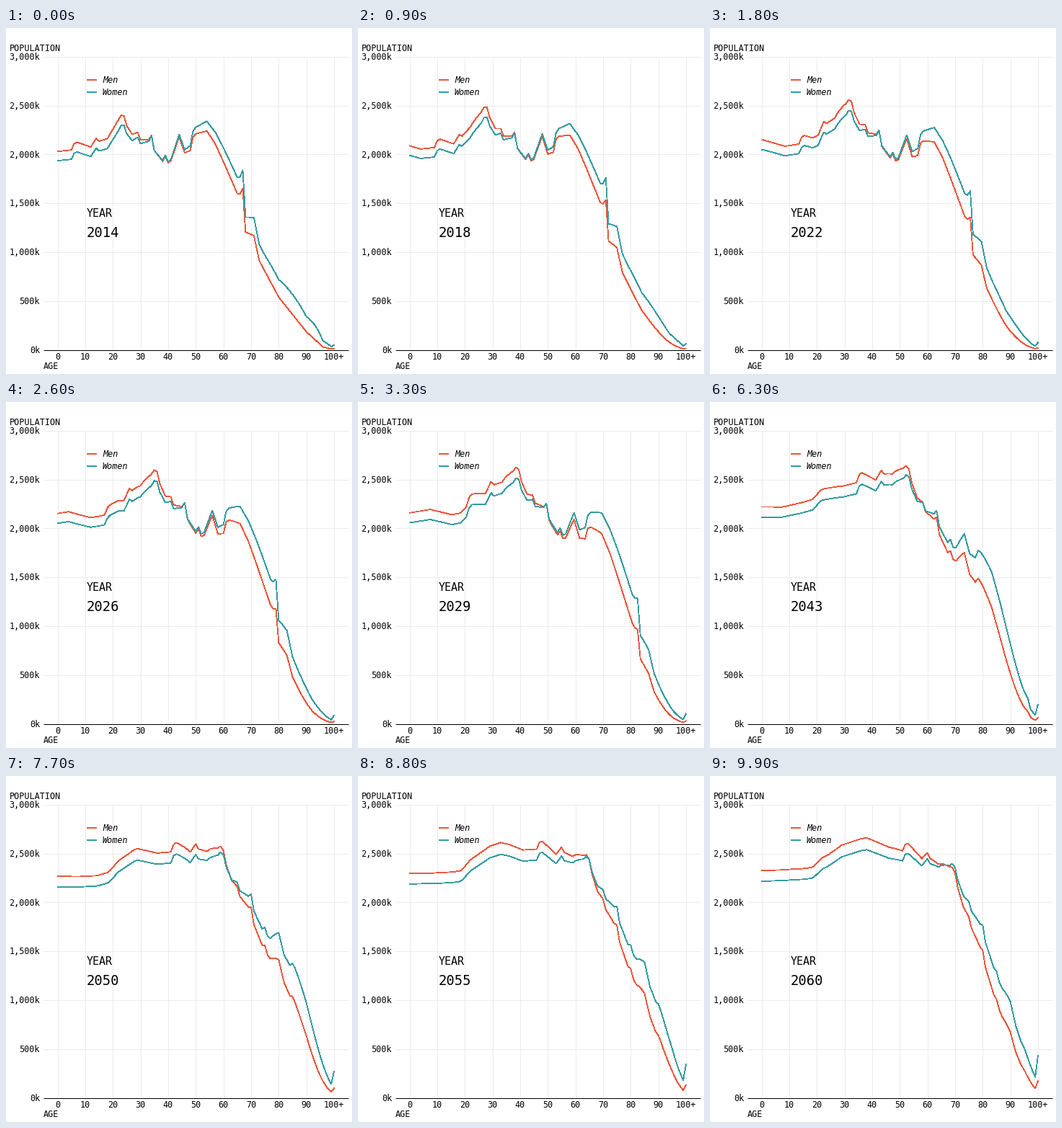
A matplotlib script for the animation above (10 s loop, 480 by 480 pixels).

```python
import numpy as np
import matplotlib.pyplot as plt
from matplotlib.animation import FuncAnimation

SIZE, DPI, FRAMES = 480, 100, 100
FIRST, SPAN = 2014, 46
MEN, WOMEN, GRID = "#e8593f", "#369ba1", "#ebebeb"
PT = 72 / DPI

# Men per cohort in thousands, by age in the first year; negative ages are
# cohorts still to be born, counted at birth.
COHORTS = np.array([
    (-46, 2325), (-36, 2265), (-22, 2170), (-8, 2145), (0, 2030), (5, 2045),
    (6, 2110), (7, 2125), (12, 2075), (14, 2165), (15, 2135), (18, 2160),
    (23, 2400), (24, 2395), (25, 2295), (27, 2205), (29, 2225), (30, 2150),
    (33, 2150), (34, 2195), (35, 2040), (38, 1930), (39, 1980), (40, 1915),
    (41, 1935), (44, 2180), (46, 2015), (48, 2040), (49, 2175), (50, 2210),
    (54, 2240), (57, 2110), (60, 1925), (65, 1600), (66, 1595), (67, 1650),
    (68, 1205), (71, 1170), (73, 910), (80, 540), (90, 185), (96, 30), (99, 8)])

# Log ratio of women to men by age in the first year
RATIO = np.array([(0, -.048), (22, -.048), (35, 0), (44, .01), (56, .05),
                  (67, .109), (75, .185), (80, .287), (90, .61), (99, 1.38)])

# Log growth of a cohort by age through migration
MIGRATION = np.array([(0, 0), (8, .024), (15, .05), (18.5, .066), (22, .118),
                      (29, .18), (36, .212), (46, .24)])

# mid, scale: old-age mortality; loss: extra midlife mortality;
# top, rise: size and growth rate of the 100+ group
SEXES = {
    "men": dict(mid=86, scale=8.6, loss=.15, top=12, rise=.058),
    "women": dict(mid=88.6, scale=8, loss=.06, top=50, rise=.047),
}


def lookup(x, points):
    return np.interp(x, *points.T)


def log_size(age, t, sex):
    """Log of a cohort's size relative to its birth; lifespans grow with t."""
    p = SEXES[sex]
    mortality = np.exp((age - p["mid"] - .08 * t) / p["scale"])
    midlife = p["loss"] * (np.maximum(age - 46, 0) / 44) ** 2
    return lookup(age, MIGRATION) - midlife - mortality


def population(t, sex):
    """Ages and counts at time t; each cohort slides along the age axis."""
    age = np.concatenate([[0], np.arange(t % 1, 99), [99]])
    start = age - t
    change = log_size(age, t, sex) - log_size(np.maximum(start, 0), 0, sex)
    if sex == "women":
        change = change + lookup(start, RATIO)
    count = lookup(start, COHORTS) * np.exp(change)
    p = SEXES[sex]
    return np.append(age, 100), np.append(count, p["top"] * np.exp(p["rise"] * t))


def px(age):
    return 71.5 + 3.835 * np.asarray(age)


def py(count):
    return 446.5 - 0.1356 * np.asarray(count)


fig = plt.figure(figsize=(SIZE / DPI, SIZE / DPI), dpi=DPI, facecolor="white")
ax = fig.add_axes([0, 0, 1, 1])
ax.set(xlim=(0, SIZE), ylim=(SIZE, 0))
ax.axis("off")


def rule(xs, ys, color, width=1.0, z=1):
    ax.plot(xs, ys, color=color, lw=width * PT, zorder=z, solid_capstyle="butt")


def curve(color, z):
    return ax.plot([], [], color=color, lw=0.8 * PT, zorder=z,
                   antialiased=False, solid_joinstyle="round")[0]


def label(x, y, text, size=11.7, **kw):
    return ax.text(x, y, text, fontsize=size * PT, color="black",
                   family="DejaVu Sans Mono", va="baseline", **kw)


for v in range(0, 3001, 500):
    rule([52, 475], [py(v)] * 2, GRID)
    label(47, py(v) + 4.2, f"{v:,}k", ha="right")
for a in range(0, 101, 10):
    rule([px(a)] * 2, [39.5, 446.5], GRID)
    label(px(a), 460, "100+" if a == 100 else str(a), ha="center")
rule([52, 475], [py(0)] * 2, "black", z=4)

label(5, 32, "POPULATION")
label(52, 473, "AGE")
label(112, 262, "YEAR", 15)
year = label(112, 290, "", 18.9)
for y, name, color in [(72, "Men", MEN), (89, "Women", WOMEN)]:
    rule([112, 126], [y, y], color, 2)
    label(134, y + 4, name, style="italic")

lines = {"men": curve(MEN, 2), "women": curve(WOMEN, 3)}

# Each year lands on the nearest whole frame
YEARS = np.arange(SPAN + 1)
YEAR_FRAMES = np.rint((FRAMES - 1) * YEARS / SPAN)


def draw(i):
    t = np.interp(i, YEAR_FRAMES, YEARS)
    for sex, line in lines.items():
        age, count = population(t, sex)
        line.set_data(px(age), py(count))
    year.set_text(str(FIRST + round(i * SPAN / (FRAMES - 1))))
    return [*lines.values(), year]


anim = FuncAnimation(fig, draw, frames=FRAMES, interval=100, repeat=True,
                     repeat_delay=0, blit=False)
plt.show()
```
